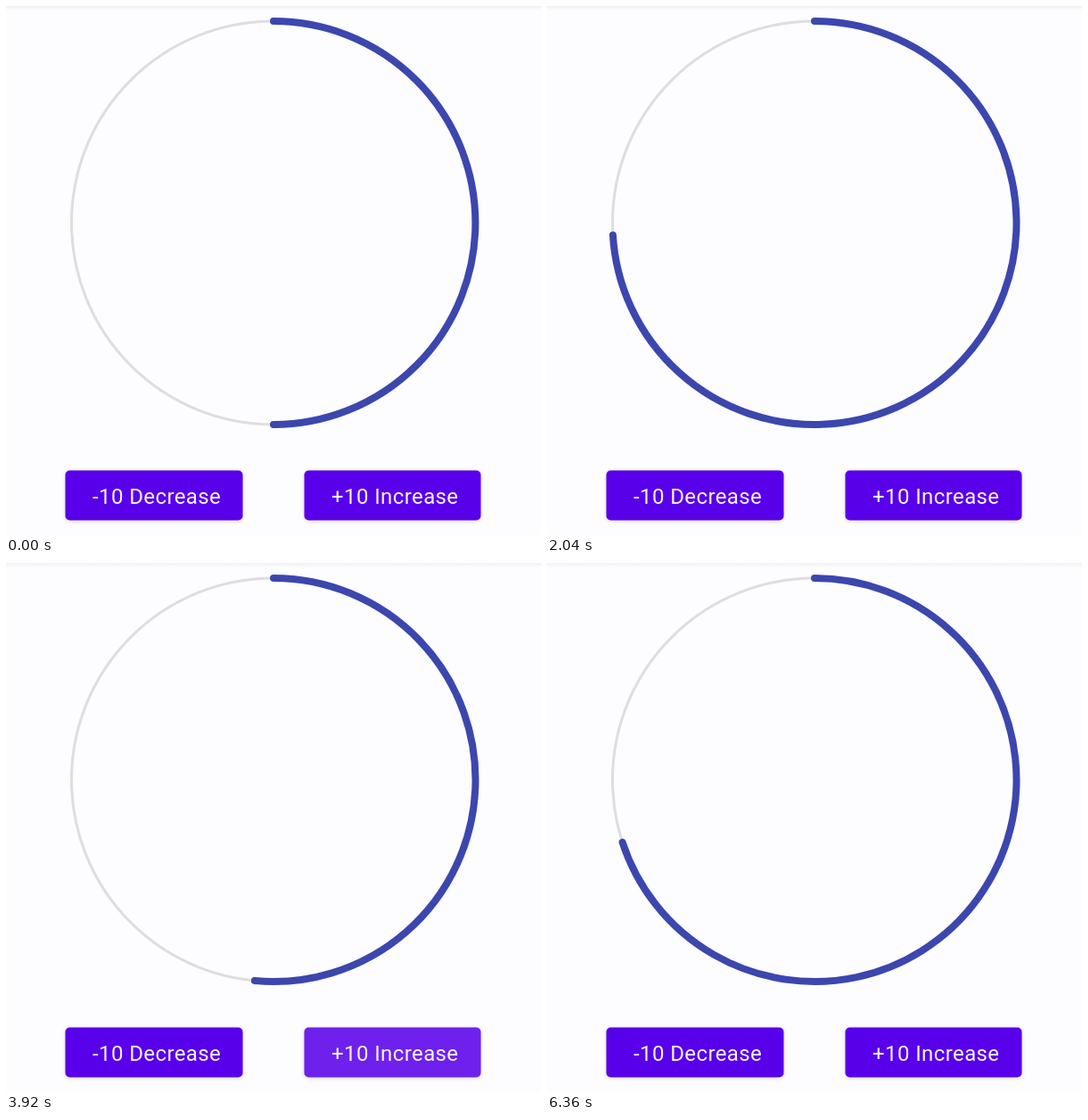
An HTML page for the animation above (6.4 s loop, 600 by 594 pixels).

```html
<!DOCTYPE html>
<html lang="en">
<head>
<meta charset="utf-8">
<title>Circular progress</title>
<style>
  html, body { margin: 0; width: 100%; height: 100%; overflow: hidden; background: #fdfcfe; }
  svg { display: block; width: 100vw; height: 100vh; }
  text { font: 400 24px Roboto, "Noto Sans", sans-serif; letter-spacing: .4px; fill: #f7f2ff; white-space: pre; }
</style>
</head>
<body>
<svg viewBox="0 0 600 594">
  <defs>
    <linearGradient id="edge" x2="0" y2="1">
      <stop stop-color="#f1f0f3"/><stop offset="1" stop-color="#fdfcfe"/>
    </linearGradient>
    <filter id="soft" x="-20%" y="-40%" width="140%" height="190%"><feGaussianBlur stdDeviation="2.5"/></filter>
  </defs>
  <rect width="600" height="594" fill="#fdfcfe"/>
  <rect width="600" height="5" fill="url(#edge)"/>
  <circle cx="300" cy="243.5" r="226.5" fill="none" stroke="#dddde2" stroke-width="3"/>
  <path id="arc" fill="none" stroke="#3b47ae" stroke-width="8" stroke-linecap="round"/>
  <g id="buttons"></g>
</svg>
<script>
const LOOP = 6400, STEP = 40, TWEEN = 1000;
const START = 50, CX = 300, CY = 243.5, R = 226.5;

// [change, pointer down, pointer up]
const taps = [
  [10, 250, 330], [10, 920, 1108], [10, 1500, 1700],
  [-10, 2100, 2252], [-10, 2555, 2878], [-10, 3180, 3299],
  [10, 3875, 4160], [10, 4340, 4488]
];

const clamp = v => Math.max(0, Math.min(1, v));
const ramp = (t, from, to) => clamp((t - from) / (to - from));

// cubic-bezier(.4, 0, .2, 1)
function ease(x) {
  if (x <= 0) return 0;
  if (x >= 1) return 1;
  let lo = 0, hi = 1;
  for (let i = 0; i < 24; i++) {
    const s = (lo + hi) / 2, q = 1 - s;
    if (1.2 * q * q * s + .6 * q * s * s + s * s * s < x) lo = s; else hi = s;
  }
  return lo * lo * (3 - 2 * lo);
}

// Each tap restarts the tween from the current value.
function valueAt(t) {
  let from = START, target = START, since = 0;
  const at = time => from + (target - from) * ease((time - since) / TWEEN);
  for (const [change, , up] of taps) {
    if (up > t) break;
    from = at(up);
    target += change;
    since = up;
  }
  return at(t);
}

function make(tag, attrs, parent) {
  const el = document.createElementNS("http://www.w3.org/2000/svg", tag);
  for (const key in attrs) el.setAttribute(key, attrs[key]);
  return parent.appendChild(el);
}

function makeButton(x, width, textX, label, sign, touchX) {
  const root = document.getElementById("buttons");
  const box = { x, y: 521.5, width, height: 56, rx: 5 };
  const id = "clip" + x;
  make("rect", box, make("clipPath", { id }, root));
  make("rect", { ...box, y: 522.5, fill: "#000", opacity: .14, filter: "url(#soft)" }, root);
  const lift = make("rect", { ...box, y: 525.5, fill: "#000", opacity: 0, filter: "url(#soft)" }, root);
  make("rect", { ...box, fill: "#5800ea" }, root);
  const layer = make("rect", { ...box, fill: "#fff", opacity: 0 }, root);
  const ripple = make("circle", { cx: touchX, cy: 552, r: 0, fill: "#fff", opacity: 0, "clip-path": `url(#${id})` }, root);
  make("text", { x: textX, y: 559 }, root).textContent = label;
  return { sign, lift, layer, ripple };
}

const buttons = [
  makeButton(66.5, 199, 97, "-10 Decrease", -1, 220),
  makeButton(334.5, 198, 365, "+10 Increase", 1, 440)
];
const arc = document.getElementById("arc");

function drawButton({ sign, lift, layer, ripple }, t) {
  let shade = 0, glow = 0, wave = 0, radius = 0;
  for (const [change, down, up] of taps) {
    if (change * sign < 0 || t < down) continue;
    const fade = 1 - ramp(t, up + 180, up + 290);
    const grow = ramp(t, down + 60, down + 285);
    glow = Math.max(glow, .17 * ramp(t, down, down + 60) * fade);
    shade = Math.max(shade, .3 * ramp(t, down + 50, down + 150) * (1 - ramp(t, up + 60, up + 200)));
    if (fade > 0) {
      wave = .2 * ramp(t, down + 60, down + 100) * fade;
      radius = 20 + 160 * grow;
    }
  }
  lift.setAttribute("opacity", shade);
  layer.setAttribute("opacity", glow);
  ripple.setAttribute("opacity", wave);
  ripple.setAttribute("r", radius);
}

function draw(t) {
  const value = valueAt(t), a = value / 100 * 2 * Math.PI;
  const x = CX + R * Math.sin(a), y = CY - R * Math.cos(a);
  arc.setAttribute("d", `M${CX} ${CY - R}A${R} ${R} 0 ${value > 50 ? 1 : 0} 1 ${x} ${y}`);
  buttons.forEach(b => drawButton(b, t));
}

const begin = performance.now();
function tick() {
  const t = (performance.now() - begin) % LOOP;
  draw(Math.floor(t / STEP) * STEP);
  requestAnimationFrame(tick);
}
tick();
</script>
</body>
</html>
```
